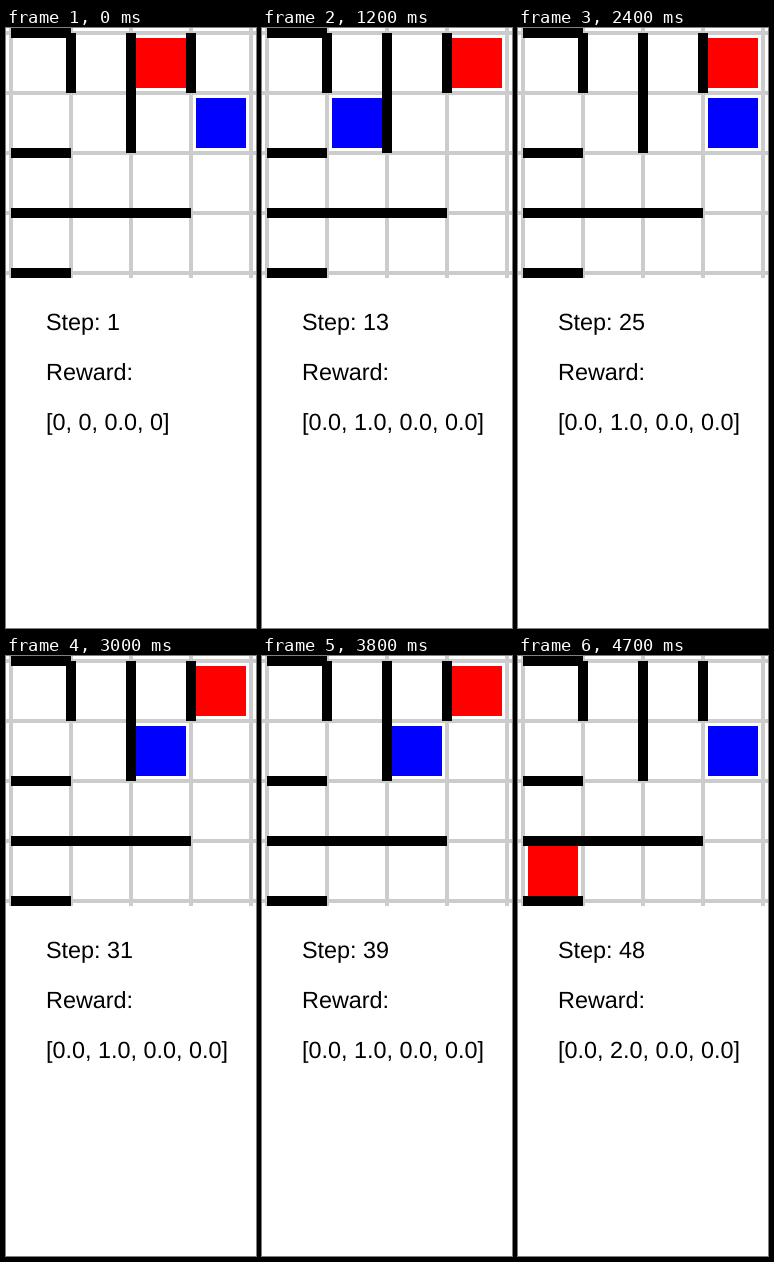
Recreate the animation shown at these times as an HTML page. Size 250 by 600 pixels, loop 4800 ms.

```html
<!DOCTYPE html>
<html lang="en">
<head>
<meta charset="utf-8">
<title>Grid walk</title>
<style>
  html, body { margin: 0; width: 100%; height: 100%; overflow: hidden; background: #fff; }
  svg { display: block; }
  text { font: 23.4px "Liberation Sans", Arial, sans-serif; text-rendering: geometricPrecision; white-space: pre; }
</style>
</head>
<body>
<svg width="250" height="600" viewBox="0 0 250 600">
  <path d="M0 5H250M0 65H250M0 125H250M0 185H250M0 245H250M5 0V250M65 0V250M125 0V250M185 0V250M245 0V250"
        stroke="#ccc" stroke-width="4"/>
  <rect id="goal" width="50" height="50" fill="#f00"/>
  <rect id="agent" width="50" height="50" fill="#00f"/>
  <path d="M5 5H65M5 125H65M5 185H185M5 245H65M65 5V65M125 5V125M185 5V65"
        stroke="#000" stroke-width="10"/>
  <text id="step" x="40" y="302"></text>
  <text x="40" y="352">Reward:</text>
  <text id="reward" x="40" y="402"></text>
</svg>
<script>
const STEP_MS = 100;
const $ = id => document.getElementById(id);

// Cell (column, row) of the agent at each step; the world wraps at its edges.
const path = ("31 01 31 32 33 30 30 33 23 22 12 12 11 10 10 11 11 10 10 10 11 01 31 32 " +
  "31 21 20 20 21 21 21 31 01 31 32 22 32 22 21 21 31 32 33 23 23 23 33 31").split(" ");

// Values that hold from the given step on.
const goals = [[1, "20"], [10, "30"], [48, "03"]];
const rewards = [
  [1, "[0, 0, 0.0, 0]"],
  [2, "[0, 0, 0.0, 0.0]"],
  [4, "[0, 0.0, 0.0, 0.0]"],
  [8, "[0.0, 0.0, 0.0, 0.0]"],
  [10, "[0.0, 1.0, 0.0, 0.0]"],
  [48, "[0.0, 2.0, 0.0, 0.0]"]
];
const valueAt = (list, step) => list.filter(([from]) => from <= step).pop()[1];

function place(id, [col, row]) {
  $(id).setAttribute("x", 10 + 60 * col);
  $(id).setAttribute("y", 10 + 60 * row);
}

function draw(ms) {
  const step = Math.floor(ms / STEP_MS) % path.length + 1;
  place("agent", path[step - 1]);
  place("goal", valueAt(goals, step));
  $("step").textContent = "Step: " + step;
  $("reward").textContent = valueAt(rewards, step);
}

const start = performance.now();
function tick() {
  draw(performance.now() - start);
  requestAnimationFrame(tick);
}
tick();
</script>
</body>
</html>
```
